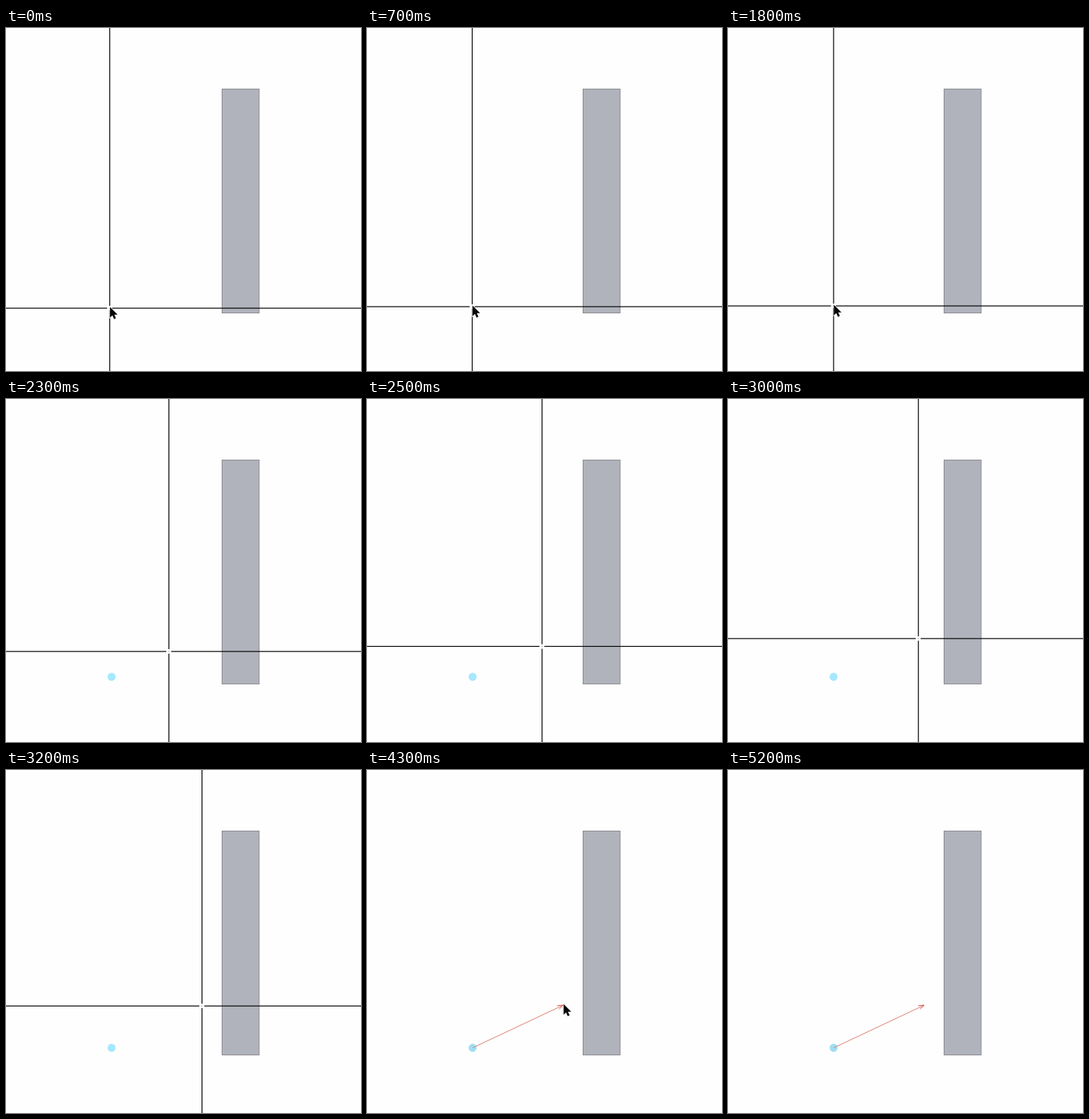
Animation of 474x458 px, one loop 6000 ms. Source, as an HTML page:

```html
<!DOCTYPE html>
<html lang="en">
<head>
<meta charset="utf-8">
<title>Placing an arrow</title>
<style>
  html, body { margin: 0; width: 100%; height: 100%; overflow: hidden; background: #fefefe; }
  svg { display: block; width: 474px; height: 458px; }
  .cross { stroke: #0c0c0c; stroke-width: 1.25; }
  .arrow { fill: none; stroke: #dd8270; stroke-width: 1; }
  .head { stroke: #d8564a; }
  .pointer { fill: #080808; stroke: #fff; stroke-width: 1.2; paint-order: stroke; }
</style>
</head>
<body>
<svg viewBox="0 0 474 458">
  <rect x="288.5" y="81.5" width="49.5" height="299" fill="#b0b3bb" stroke="#8d8b90" stroke-width="1"/>
  <circle id="dot" cx="141" cy="371" r="5.4" fill="#a6e8fd"/>
  <g id="arrow" class="arrow">
    <path d="M141 371L262 314"/>
    <path class="head" d="M254 314.7L262 314L256.4 319.2"/>
  </g>
  <g id="cross" class="cross">
    <path d="M-474 0H-3.5M3 0H474M0 -458V-3M0 3V458"/>
    <path d="M-.5 0H.5" opacity=".5"/>
  </g>
  <path id="pointer" class="pointer" d="M0 0V14.3L3.3 11.3L5.5 16.2L8 15.1L5.8 10.3H10.2Z"/>
</svg>
<script>
const LOOP = 6000, STEP = 100;
const [dot, arrow, cross, pointer] =
  ['dot', 'arrow', 'cross', 'pointer'].map(id => document.getElementById(id));

// time, x, y, easing power towards this stop (0 = jump)
const stops = [
  [0, 138.5, 374, 0],
  [300, 138.5, 374, 0],
  [700, 140.5, 372, 1],
  [1800, 141, 371, 0],
  [2000, 141, 371, 0],
  [2300, 217.5, 337, 1.3],
  [2800, 244.5, 326, 1.8],
  [3200, 261.7, 315, 1.2],
  [3900, 261.7, 314, 0],
  [LOOP, 261.7, 314, 0]
];

function crossAt(t) {
  const i = stops.findIndex(s => t < s[0]);
  const [t0, x0, y0] = stops[i - 1];
  const [t1, x1, y1, power] = stops[i];
  const k = power ? 1 - (1 - (t - t0) / (t1 - t0)) ** power : 0;
  return [x0 + (x1 - x0) * k, y0 + (y1 - y0) * k];
}

const show = (el, on) => el.setAttribute('visibility', on ? 'visible' : 'hidden');
const place = (el, x, y) => el.setAttribute('transform', `translate(${x} ${y})`);

function draw(time) {
  const t = Math.floor((time % LOOP) / STEP) * STEP;
  const [x, y] = crossAt(t);
  place(cross, x, y);
  show(cross, t < 4200);
  show(dot, t >= 2100);
  dot.setAttribute('fill', t < 4200 ? '#a6e8fd' : '#a0def4');
  show(arrow, t >= 4200);

  const leaving = Math.max(0, t - 4900) / STEP;
  if (t < 2100) place(pointer, x + .3, y - 1.5);
  else place(pointer, 262.5, 312.5 + 50 * leaving);
  show(pointer, t < 2100 || (t >= 4300 && t < 5200));
}

const start = performance.now();
function tick() {
  draw(performance.now() - start);
  requestAnimationFrame(tick);
}
tick();
</script>
</body>
</html>
```
